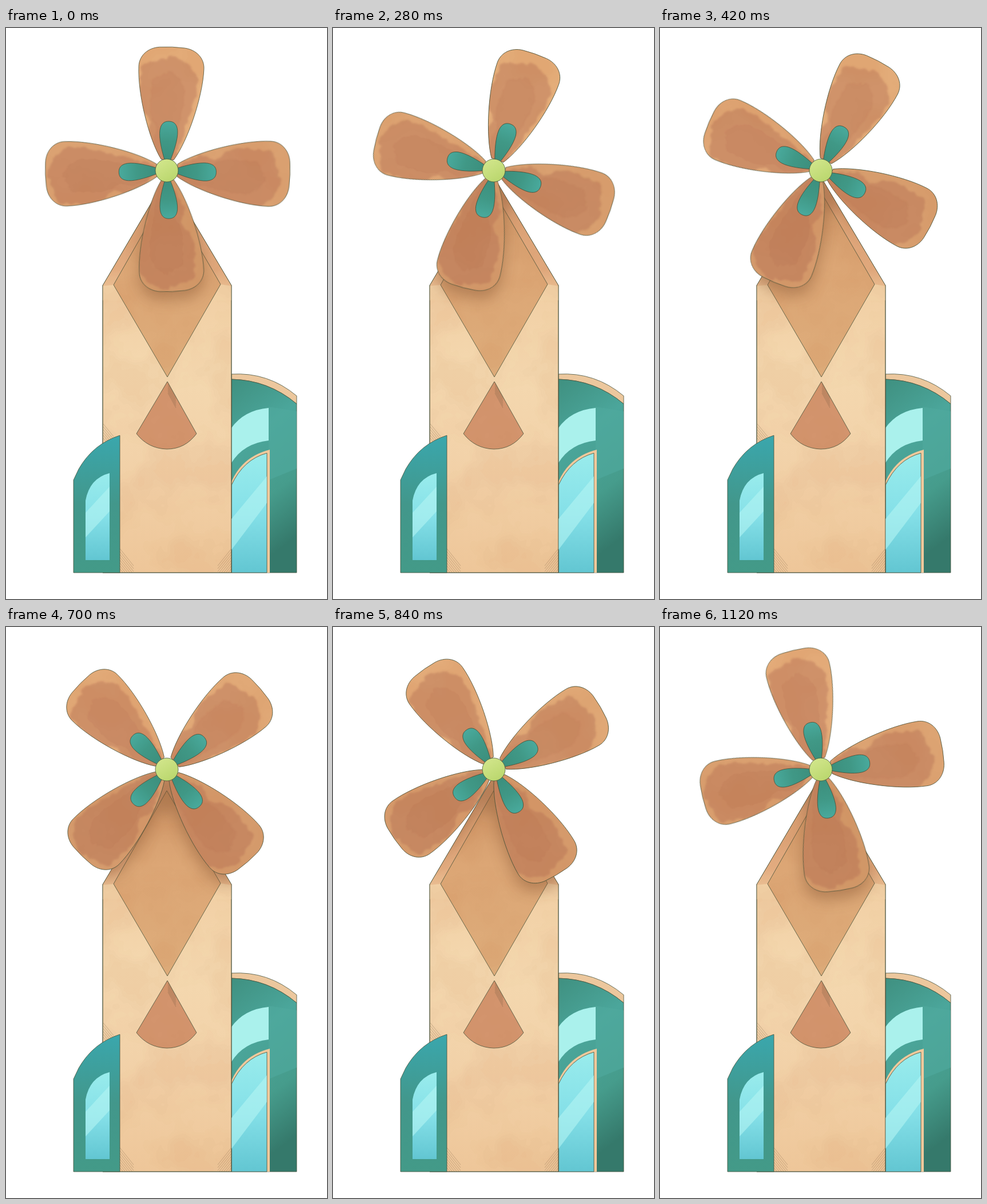
Animation of 561 by 998 pixels, one loop 1260 ms. Source, as an HTML page:

```html
<!DOCTYPE html>
<html lang="en">
<head>
<meta charset="utf-8">
<title>Windmill</title>
<style>
  html, body { margin: 0; width: 100%; height: 100%; overflow: hidden; background: #fff; }
  svg { display: block; width: 100vw; height: 100vh; }
  .line { stroke: #48523a; stroke-width: .8; }
</style>
</head>
<body>
<svg viewBox="0 0 561 998">
  <defs>
    <path id="blade" d="M-11-18C-34-52-57-130-57-179C-57-198-42-212-22-214Q0-216 22-214C42-212 57-198 57-179C57-130 34-52 11-18Z"/>
    <path id="petal" d="M-5-18C-10-32-17-55-15.500-70C-14-82-8-86 0-86C8-86 14-82 15.500-70C17-55 10-32 5-18Z"/>
    <path id="tower" d="M169 952V450L281 260L394 450V952Z"/>
    <path id="rightBody" d="M394 614Q458 615 508 657V952H394Z"/>
    <path id="leftBody" d="M118 952V790L127 771Q152 727 199 712V952Z"/>
    <path id="leftPane" d="M139 930V826Q146 787 181 778V930Z"/>
    <path id="topPane" d="M394 699Q416 668 459 664V721Q415 726 394 760Z"/>
    <path id="door" d="M394 799Q415 754 456 743V952H394Z"/>
    <clipPath id="inBlade"><use href="#blade"/></clipPath>
    <clipPath id="inTower"><use href="#tower"/></clipPath>
    <clipPath id="inPanes"><use href="#leftPane"/><use href="#door"/></clipPath>

    <linearGradient id="wall" x1="0" y1="450" x2="0" y2="952" gradientUnits="userSpaceOnUse">
      <stop stop-color="#f1cea3"/><stop offset=".3" stop-color="#f4d8af"/>
      <stop offset=".6" stop-color="#f2d2a9"/><stop offset="1" stop-color="#eec699"/>
    </linearGradient>
    <linearGradient id="roof" x1="0" y1="260" x2="0" y2="475" gradientUnits="userSpaceOnUse">
      <stop stop-color="#d79d72"/><stop offset=".75" stop-color="#e2ab7f"/>
      <stop offset="1" stop-color="#f1cea3"/>
    </linearGradient>
    <linearGradient id="diamond" x1="0" y1="286" x2="0" y2="610" gradientUnits="userSpaceOnUse">
      <stop stop-color="#cf9768"/><stop offset=".4" stop-color="#dca675"/><stop offset="1" stop-color="#dead7b"/>
    </linearGradient>
    <linearGradient id="teal" x1="0" y1="0" x2=".25" y2="1">
      <stop stop-color="#3f9080"/><stop offset=".35" stop-color="#4ba69b"/>
      <stop offset=".7" stop-color="#469c8c"/><stop offset="1" stop-color="#35796b"/>
    </linearGradient>
    <linearGradient id="sea" x1="0" y1="0" x2="0" y2="1">
      <stop stop-color="#3aa7ad"/><stop offset=".5" stop-color="#42978b"/><stop offset="1" stop-color="#439a88"/>
    </linearGradient>
    <linearGradient id="glass" x1="0" y1="0" x2="0" y2="1">
      <stop stop-color="#99ecec"/><stop offset=".5" stop-color="#85e0e8"/><stop offset="1" stop-color="#62c6d2"/>
    </linearGradient>
    <linearGradient id="leaf" x1="0" y1="0" x2="0" y2="1">
      <stop stop-color="#49aa9d"/><stop offset=".5" stop-color="#409886"/><stop offset="1" stop-color="#3c8f7d"/>
    </linearGradient>
    <linearGradient id="hub" x1=".2" y1="0" x2=".8" y2="1">
      <stop stop-color="#d2e68c"/><stop offset="1" stop-color="#b9d66c"/>
    </linearGradient>

    <filter id="soft" x="-50%" y="-50%" width="200%" height="200%"><feGaussianBlur stdDeviation="13"/></filter>
    <filter id="rough" x="-20%" y="-20%" width="140%" height="140%">
      <feTurbulence type="fractalNoise" baseFrequency=".025" numOctaves="3" seed="4"/>
      <feDisplacementMap in="SourceGraphic" scale="34" xChannelSelector="R" yChannelSelector="G"/>
      <feGaussianBlur stdDeviation="1.6"/>
    </filter>
    <!-- stepped blotches like dried watercolour -->
    <filter id="wash" x="0" y="0" width="561" height="998" filterUnits="userSpaceOnUse" color-interpolation-filters="sRGB">
      <feTurbulence type="fractalNoise" baseFrequency=".011" numOctaves="4" seed="2"/>
      <feColorMatrix values="0 0 0 0 .75  0 0 0 0 .42  0 0 0 0 .22  2.4 0 0 0 -.7"/>
      <feComponentTransfer><feFuncA type="discrete" tableValues="0 .01 .02 .04 .06 .08"/></feComponentTransfer>
      <feComposite in2="SourceGraphic" operator="in" result="spots"/>
      <feMerge><feMergeNode in="SourceGraphic"/><feMergeNode in="spots"/></feMerge>
    </filter>
  </defs>

  <path class="line" fill="#ecc79d" d="M394 605Q458 601 508 643V657Q458 615 394 614Z"/>
  <use href="#rightBody" class="line" fill="url(#teal)"/>
  <path fill="#51ab9f" opacity=".6" d="M459 662L508 670V770L459 790Z"/>
  <use href="#topPane" fill="#aaf1ec"/>
  <path fill="#f0c99c" d="M394 793Q413 749 461 737V952H394Z"/>
  <use href="#door" class="line" fill="url(#glass)"/>

  <g filter="url(#wash)">
    <use href="#tower" class="line" fill="url(#wall)"/>
    <path fill="url(#roof)" d="M169 450L281 260L394 450L375 475H188Z"/>
    <path fill="#f2d2a7" d="M169 451L188 449L204 476H169ZM394 451L375 448L359 476H394Z"/>
    <path class="line" fill="url(#diamond)" d="M281 286L375 448L282 610L188 449Z"/>
    <path class="line" fill="#d3946d" d="M282 618L333 709Q313 736 281 736Q248 735 228 709Z"/>
  </g>
  <use href="#tower" class="line" fill="none"/>
  <path id="hatch" clip-path="url(#inTower)" fill="none" stroke="#66503a" stroke-width=".6" opacity=".5"/>
  <use href="#leftBody" class="line" fill="url(#sea)"/>
  <use href="#leftPane" fill="url(#glass)"/>
  <g clip-path="url(#inPanes)" fill="#b5f6f3" opacity=".6">
    <path d="M130 857L190 792V835L130 900ZM394 858L459 780V826L394 912Z"/>
  </g>

  <g clip-path="url(#inTower)" fill="#855231" opacity=".45">
    <g id="shadows" filter="url(#soft)"></g>
    <circle cx="281" cy="292" r="34" opacity=".8" filter="url(#soft)"/>
  </g>
  <g id="blades" filter="url(#wash)"></g>
  <g id="petals"></g>
  <circle cx="281" cy="249" r="20" class="line" fill="url(#hub)"/>
</svg>
<script>
const STEP = 140;
const turns = [0, 9, 17, 25.3, 36.5, 46.8, 57.3, 67, 79];
const vanes = [
  { lean: 2.4, size: 1 }, { lean: 2.2, size: 1 },
  { lean: -2.5, size: .99 }, { lean: -2.2, size: .99 }
];
const $ = id => document.getElementById(id);
const place = (a, size, y = 248) => `transform="translate(281.5 ${y}) rotate(${a}) scale(${size})"`;

// parallel pen strokes starting along a vertical edge
const strokes = (n, x, y, gap, dx, dy) =>
  Array.from({ length: n }, (_, i) => `M${x} ${y + i * gap}l${dx} ${dy}`).join("");
$("hatch").setAttribute("d",
  strokes(6, 170, 692, 5, 18, 22) + strokes(8, 199, 910, 5, 24, 30) +
  strokes(8, 394, 910, 5, -24, 30) + strokes(7, 283, 620, 3, 14, 26));

function blade(a, size) {
  // the dark wash sits low and left of each blade, whatever its angle
  const r = a * Math.PI / 180, c = Math.cos(r), s = Math.sin(r);
  const dx = -6 * c + 6 * s, dy = 6 * s + 6 * c;
  const wash = (w, h, fill, alpha) =>
    `<use href="#blade" transform="translate(${dx} ${dy}) scale(${w} ${h})" fill="${fill}" opacity="${alpha}" filter="url(#rough)"/>`;
  return `<g ${place(a, size)}><use href="#blade" fill="#e4ad7a"/><g clip-path="url(#inBlade)">
    ${wash(.86, .92, "#ce916a", .9)}${wash(.5, .8, "#bf7d5a", .28)}
    <use href="#blade" fill="#ab6845" opacity="${.3 * (1 - c) / 2}"/></g>
    <use href="#blade" class="line" fill="none"/></g>`;
}

function draw(step) {
  const each = f => vanes.map((v, i) => f(90 * i + v.lean + turns[step], v.size)).join("");
  $("shadows").innerHTML = each((a, size) => `<use href="#blade" ${place(a, size, 262)}/>`);
  $("blades").innerHTML = each(blade);
  $("petals").innerHTML = each((a, size) =>
    `<use href="#petal" class="line" fill="url(#leaf)" ${place(a, size * size, 249)}/>`);
}

const start = performance.now();
let shown = -1;
function tick() {
  const step = Math.floor((performance.now() - start) / STEP) % turns.length;
  if (step !== shown) draw(shown = step);
  requestAnimationFrame(tick);
}
tick();
</script>
</body>
</html>
```
